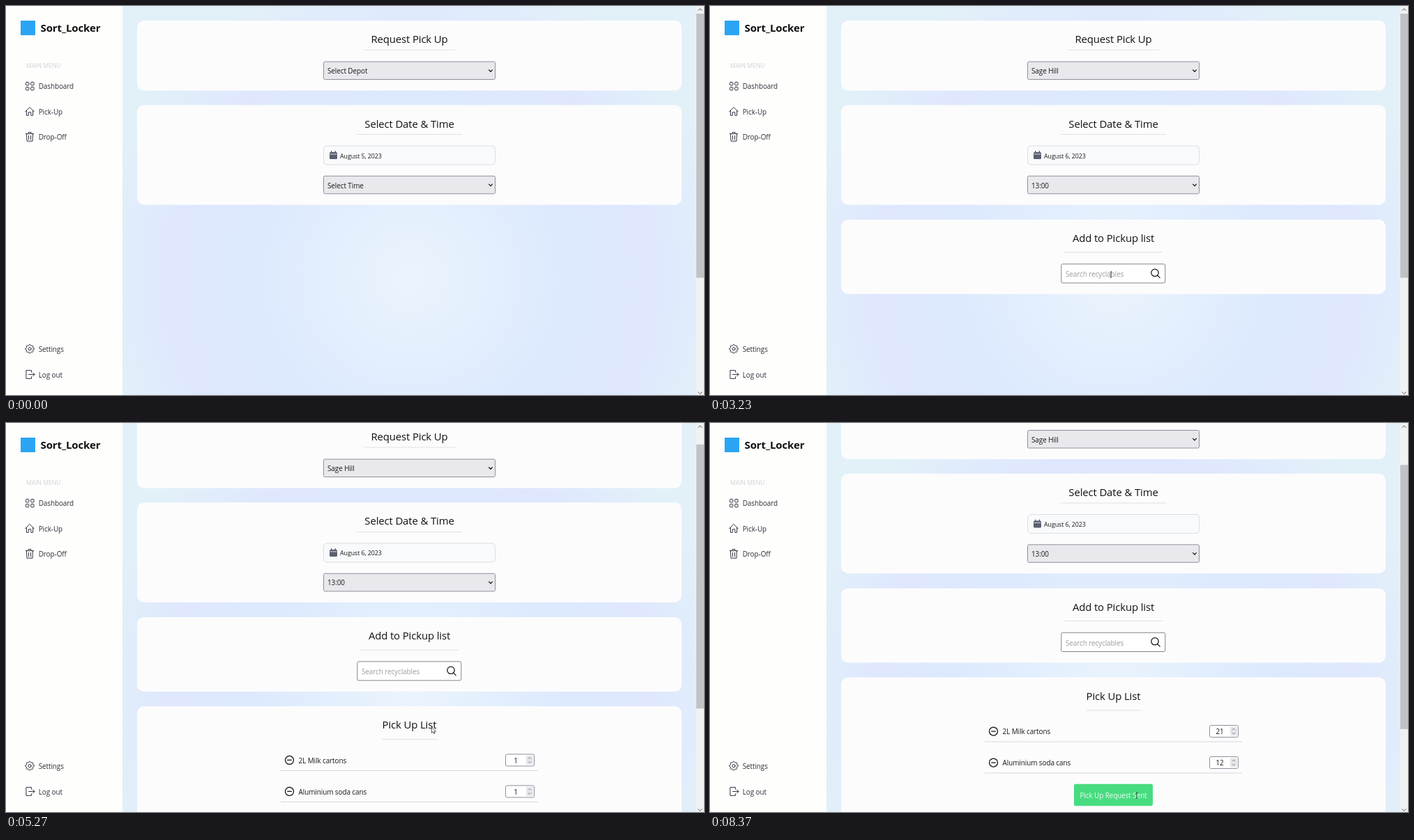
Recreate the animation shown at these times as an HTML page. Size 1001 by 559 pixels, loop 8410 ms.

```html
<!DOCTYPE html>
<html lang="en">
<head>
<meta charset="utf-8">
<title>Request Pick Up</title>
<style>
html, body { margin: 0; width: 100%; height: 100%; overflow: hidden; background: #fefefc; }
svg { display: block; width: 100vw; height: 100vh; }
text { font-family: "Open Sans", "Noto Sans", sans-serif; font-size: 9.93px; letter-spacing: -.008em; fill: #18181b; }
.head { font-size: 14.9px; fill: #111; }
.mid { text-anchor: middle; }
.line { fill: none; stroke: #2f3440; stroke-width: 1; stroke-linejoin: round; stroke-linecap: round; }
.bold { stroke: #111; stroke-width: 1.25; }
.rule { stroke: #e1e1e6; }
.select { fill: #e9e9ed; stroke: #8f8f9d; }
.card { fill: #fcfcfd; }
</style>
</head>
<body>
<svg id="stage" viewBox="0 0 1001 559" preserveAspectRatio="none"></svg>
<script>
const LOOP = 8410, MID = 578.5;

const text = (x, y, s, cls = '', extra = '') => `<text x="${x}" y="${y}" class="${cls}" ${extra}>${s}</text>`;
const rect = (x, y, w, h, r, extra = '') => `<rect x="${x}" y="${y}" width="${w}" height="${h}" rx="${r}" ${extra}/>`;
const path = (d, cls = 'line', extra = '') => `<path d="${d}" class="${cls}" ${extra}/>`;
const card = (y, h, id = '') => rect(188, y, 781, h, 10, `class="card" ${id && `id="${id}"`}`);

const heading = (y, s, half, ruleY) =>
  text(MID, y, s, 'head mid') + path(`M${MID - half} ${ruleY}H${MID + half}`, 'rule');

const select = (y, id) => rect(455.5, y, 246, 25.5, 2, 'class="select"') +
  text(461, y + 17.2, '', '', `id="${id}"`) + path(`M692.6 ${y + 11.8}l2.4 2.6l2.4 -2.6`, 'line bold');

function row(i, name) {
  const y = 512.5 + 45 * i;
  return `<g id="row${i}"><circle cx="406.5" cy="${y}" r="6" class="line bold"/>` +
    path(`M403.7 ${y}h5.6`, 'line bold') + text(419.5, y + 4.4, name) +
    rect(716.5, y - 8.5, 41, 17, 2, `id="box${i}" fill="#fff"`) +
    rect(746, y - 6.5, 10, 13, 1, 'fill="#e6e6ea"') +
    path(`M749 ${y - 2}l2 -2l2 2M749 ${y + 2}l2 2l2 -2`, 'line', 'style="stroke:#777;stroke-width:.8"') +
    text(731, y + 4.4, '1', 'mid', `id="num${i}"`) +
    path(`M0 ${y - 5}v10`, 'line', `id="caret${i}" style="stroke-width:.8"`) +
    path(`M394 ${y + 15}H763`, 'rule', 'style="stroke:#d6d7dc"') + '</g>';
}

function gear(cx, cy) {
  let d = '';
  for (let i = 0; i < 32; i++) {
    const a = (i - .5) / 32 * 2 * Math.PI, r = i % 4 < 2 ? 6.3 : 5;
    d += `${i ? 'L' : 'M'}${(cx + r * Math.cos(a)).toFixed(2)} ${(cy + r * Math.sin(a)).toFixed(2)}`;
  }
  return path(d + 'Z') + `<circle cx="${cx}" cy="${cy}" r="2.1" class="line"/>`;
}

const tiles = [28.5, 35.7].map(x => [109.5, 116.5].map(y => rect(x, y, 4.4, 4.4, 1, 'class="line"')).join('')).join('');

const sidebar = rect(0, 0, 167, 559, 0, 'fill="#fefefc"') +
  rect(21, 21, 21, 21, 0, 'fill="#2ba5f3"') +
  text(49.5, 37.4, 'Sort_Locker', '', 'style="font-size:15px;font-weight:700;fill:#111"') +
  text(29, 88.6, 'MAIN MENU', '', 'style="font-size:8.7px;fill:#d0d1d6"') + tiles +
  path('M27.7 151.8L34 145.4L40.3 151.8M29.4 150.3V157.3H32.2V152.7H35.8V157.3H38.6V150.3') +
  path('M28.3 183.6H39.7M32 183.4V181.5H36V183.4M29.5 183.8L30 194.2H38L38.5 183.8M32.5 186.3V191.8M35.5 186.3V191.8') +
  gear(34, 492.7) +
  path('M36.5 526.2V523.6H28.9V535.4H36.5V532.8M32.6 529.5H41M38.6 527L41 529.5L38.6 532') +
  [['Dashboard', 119.3], ['Pick-Up', 156], ['Drop-Off', 192.3], ['Settings', 497.3], ['Log out', 534]]
    .map(([s, y]) => text(46.7, y, s, '', 'style="fill:#2b2f38"')).join('');

const page = card(21, 100.5) + heading(53, 'Request Pick Up', 65.5, 63) + select(80, 'depot') +
  card(142.3, 143.5) + heading(174.5, 'Select Date &amp; Time', 76, 184.5) +
  rect(455.5, 201, 246, 27, 4.5, 'fill="#f9fafb" stroke="#dcdde3"') +
  rect(464, 210, 11, 10, 1.5, 'fill="#596070"') +
  path('M466.7 208.7v2M472.3 208.7v2', 'line', 'style="stroke:#596070;stroke-width:1.5"') +
  path('M465 212.9h9', 'line', 'style="stroke:#f9fafb;stroke-width:.8"') +
  text(479, 218.5, '', '', 'id="date" style="font-size:8.85px"') + select(244.3, 'time') +
  '<g id="adder">' + card(307, 107) + heading(339, 'Add to Pickup list', 70.5, 354) +
  rect(503.8, 370.8, 149, 27.2, 2, 'fill="#fff" stroke="#85858c"') +
  text(510, 389, 'Search recyclables', '', 'style="fill:#9b9ba3"') +
  '<circle cx="638" cy="383.3" r="5.2" class="line bold"/>' + path('M641.8 387.1L645.2 390.6', 'line bold') + '</g>' +
  '<g id="list">' + card(435, 200, 'listCard') + heading(467, 'Pick Up List', 39.5, 482.5) +
  row(0, '2L Milk cartons') + row(1, 'Aluminium soda cans') +
  '<g id="submit">' + rect(393.5, 543.3, 369.5, 26, 2, 'id="button"') +
  text(MID, 561, 'Submit Pick Up Request', 'mid', 'style="fill:#edf4ff"') + '</g>' +
  '<g id="sent">' + rect(522, 588.3, 113, 31.4, 2.5, 'fill="#48dc80"') +
  text(MID, 608.8, 'Pick Up Request Sent', 'mid', 'style="fill:#edfff4"') + '</g></g>';

const bar = rect(990, 0, 11, 559, 0, 'fill="#f1f1f2"') + rect(990, 11, 11, 379.5, 0, 'id="thumb" fill="#c2c2c5"') +
  path('M992.8 6.5l2.7 -2.7l2.7 2.7M992.8 554.8l2.7 2.7l2.7 -2.7', 'line', 'style="stroke:#555"');

const cursor = '<g id="cursor" stroke="#333" stroke-width=".8" stroke-linejoin="round" fill="#fff">' +
  '<path id="arrow" d="M0 0V8.4L2 6.6L3.4 9.6L4.7 9L3.4 6.2H6Z"/>' +
  '<path id="beam" d="M-1.5 -4H1.5M0 -4V4M-1.5 4H1.5" fill="none"/>' +
  '<path id="hand" d="M-1 1Q0 -.6 1 1V4L4.6 5Q5.6 5.3 5.4 6.6L4.5 10.4H-.2L-3 6.6Q-3 5.4 -1 6.4Z"/></g>';

const stage = document.getElementById('stage');
stage.innerHTML = `<defs><radialGradient id="sky" gradientUnits="userSpaceOnUse" cx="580" cy="390" r="460">
  <stop offset="0" stop-color="#eaf4fd"/><stop offset=".25" stop-color="#e3effd"/>
  <stop offset=".5" stop-color="#dce9fe"/><stop offset=".75" stop-color="#dfe7fe"/>
  <stop offset="1" stop-color="#e2f1f8"/></radialGradient></defs>` +
  rect(167, 0, 823, 559, 0, 'fill="url(#sky)"') + `<g id="page">${page}</g>` + sidebar + bar + cursor;

const el = {};
stage.querySelectorAll('[id]').forEach(n => el[n.id] = n);

const show = (id, on) => el[id].setAttribute('visibility', on ? 'inherit' : 'hidden');
const put = (id, s) => { if (el[id].textContent !== s) el[id].textContent = s; };
const step = (keys, t) => keys.reduce((v, k) => t >= k[0] ? k[1] : v, keys[0][1]);

// Eased interpolation through [time, value, value...] points
function glide(keys, t) {
  let i = 0;
  while (i < keys.length - 2 && t >= keys[i + 1][0]) i++;
  const [a, b] = [keys[i], keys[i + 1]];
  const u = Math.min(1, Math.max(0, (t - a[0]) / (b[0] - a[0]))), e = u * u * (3 - 2 * u);
  return a.slice(1).map((v, k) => v + (b[k + 1] - v) * e);
}

const route = [
  [100, 700, 210], [560, 600, 94], [900, 590, 104], [1300, 575, 215], [1600, 590, 218],
  [2030, 624.5, 149], [2400, 600, 258], [2800, 596, 262], [3200, 575, 386], [3650, 575, 386],
  [4000, 608, 402], [4230, 608.5, 399], [4500, 590, 386], [4900, 609, 404], [5270, 610.5, 437],
  [5480, 612, 440], [5730, 718, 443.5], [5850, 728, 444], [6380, 728, 444], [6620, 736, 489],
  [6900, 736, 489], [7180, 632.5, 534], [7500, 632.5, 534], [8000, 612, 535], [8410, 612, 535]
];
const shapes = [[0, 'arrow'], [3120, 'beam'], [3750, 'arrow'], [4420, 'beam'], [4720, 'arrow'],
  [5770, 'beam'], [6420, 'arrow'], [6570, 'beam'], [7040, 'hand'], [7560, 'arrow'], [7850, 'beam']];

function draw(t) {
  put('depot', t < 850 ? 'Select Depot' : 'Sage Hill');
  put('date', t < 1700 ? 'August 5, 2023' : 'August 6, 2023');
  put('time', t < 2800 ? 'Select Time' : '13:00');
  put('num0', t < 6100 ? '1' : '21');
  put('num1', t < 6850 ? '1' : '12');

  const sent = t >= 7500, two = t >= 4930;
  show('adder', t >= 1700);
  show('list', t >= 4000);
  show('row1', two);
  el.listCard.setAttribute('height', two ? 200 : 155);
  show('submit', !sent);
  show('sent', sent);
  el.submit.setAttribute('transform', `translate(0 ${two ? 45 : 0})`);
  el.button.setAttribute('fill', t >= 7040 ? '#3980f6' : '#5fa3fb');

  const focus = t >= 5880 && t < 6650 ? 0 : t >= 6650 && !sent ? 1 : -1;
  [0, 1].forEach(i => {
    const on = focus === i;
    el['box' + i].setAttribute('stroke', on ? '#2563c9' : '#8f8f9d');
    el['box' + i].setAttribute('stroke-width', on ? 2 : 1);
    show('caret' + i, on);
  });
  el.caret0.setAttribute('transform', `translate(${t < 6100 ? 728 : 731} 0)`);
  el.caret1.setAttribute('transform', `translate(${t < 6850 ? 734.3 : 737.3} 0)`);

  const y = sent ? 69.5 : glide([[5130, 0], [5270, 28], [5500, 69]], t)[0];
  el.page.setAttribute('transform', `translate(0 ${-y})`);
  el.thumb.setAttribute('y', 11 + y * .71);

  const [cx, cy] = glide(route, t), shape = step(shapes, t);
  show('cursor', t >= 120);
  ['arrow', 'beam', 'hand'].forEach(s => show(s, s === shape));
  el.cursor.setAttribute('transform', `translate(${cx} ${cy})`);
}

// "inherit" keeps children of hidden groups hidden
function frame() {
  draw(performance.now() % LOOP);
  requestAnimationFrame(frame);
}
draw(0);
frame();
</script>
</body>
</html>
```
